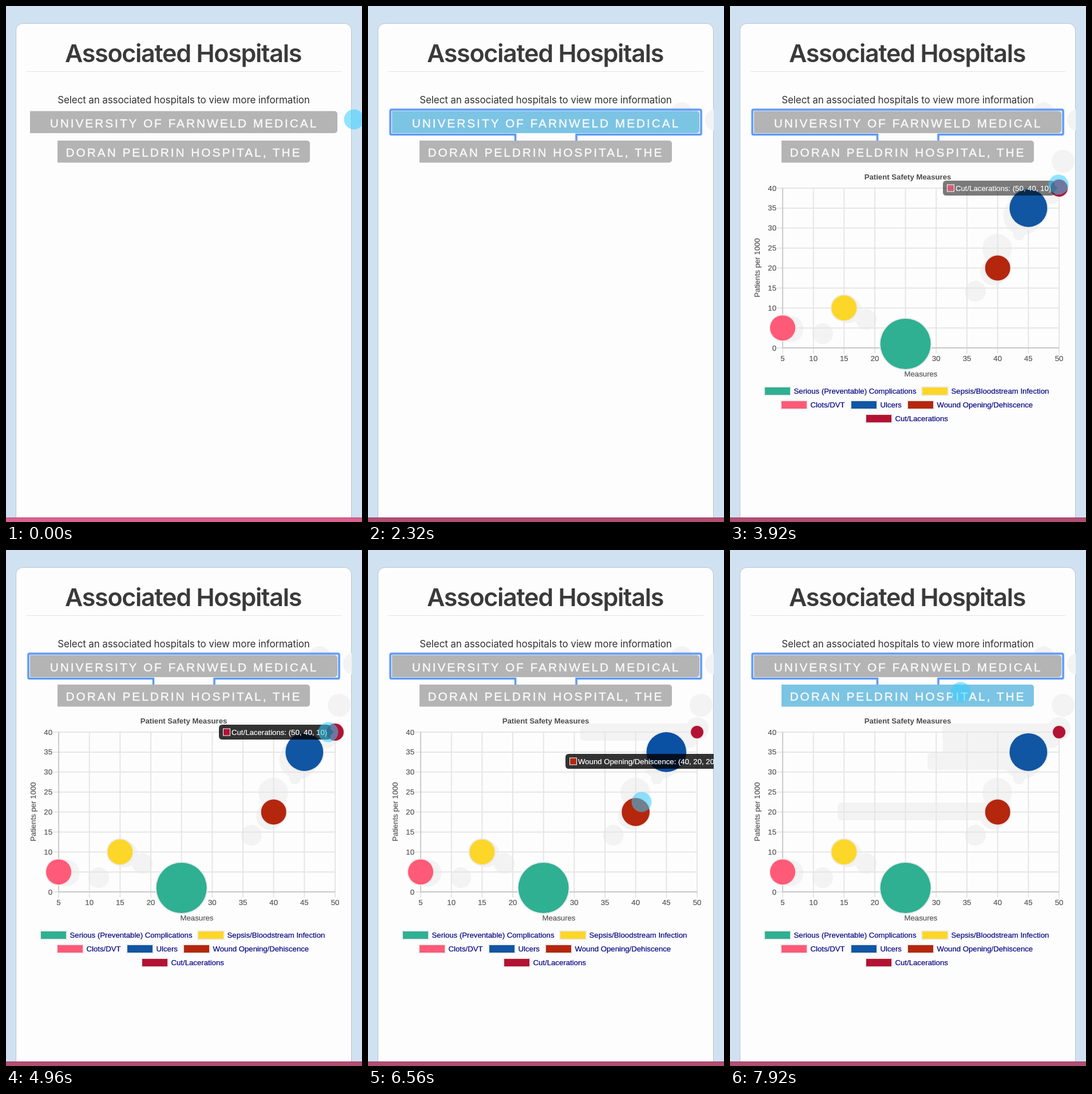
These frames come from a looping animation (622x901 px, 8000 ms). An HTML page:

```html
<!DOCTYPE html>
<html lang="en">
<head>
<meta charset="utf-8">
<title>Associated Hospitals</title>
<style>
html, body { margin: 0; width: 100%; height: 100%; overflow: hidden; background: #d0e2f2; }
svg { display: block; }
svg * { animation: 8s linear infinite; }

.head { font: 600 43px Inter, sans-serif; letter-spacing: -1.25px; fill: #3a3a3a; }
.sub { font: 400 17px Inter, sans-serif; letter-spacing: -.12px; fill: #333; }
.name {
  font: 20.8px "Liberation Sans", Arial, sans-serif; letter-spacing: 3px;
  fill: #fafafa; stroke: #fafafa; stroke-width: .4;
}
.chart, .tip { font: 13.2px "Liberation Sans", Arial, sans-serif; }
.chart text { fill: #555; stroke: #555; stroke-width: .2; }
.chart .title { font-weight: bold; fill: #4c4c4c; stroke: none; }
.chart .legend text { fill: #000080; stroke: #000080; }
.mid { text-anchor: middle; }
.end { text-anchor: end; }
.ghost { fill: #f3f3f3; }
.grid { stroke: #e6e6e6; stroke-width: 2; }
.axis { stroke: #bdbdbd; stroke-width: 1.3; fill: none; }
.halo { stroke: #ececec; stroke-width: 4; paint-order: stroke; }

/* 1% is 80 ms */
.strip { animation-name: strip; }
@keyframes strip { 0%, 7% { fill: #d9628e; } 9%, 100% { fill: #b04f72; } }
.first { animation-name: first; }
@keyframes first {
  0%, 12% { fill: #b4b4b4; } 17%, 39% { fill: #7cc4e4; } 47%, 100% { fill: #b4b4b4; }
}
.second { animation-name: second; }
@keyframes second { 0%, 94% { fill: #b4b4b4; } 99%, 100% { fill: #7cc4e4; } }
.ring {
  fill: none; stroke: #5b98f5; stroke-width: 3;
  filter: drop-shadow(0 0 1px #8fb8f8); animation-name: ring;
}
@keyframes ring { 0%, 24% { opacity: 0; } 27%, 100% { opacity: 1; } }
.chart { animation-name: chart; }
@keyframes chart { 0%, 29% { opacity: 0; } 32%, 100% { opacity: 1; } }
.grow { transform-origin: 333.5px 597px; animation-name: grow; }
@keyframes grow {
  0%, 30.6% { transform: scale(0); animation-timing-function: cubic-bezier(.25, 1, .5, 1); }
  43.1%, 100% { transform: scale(1); }
}
.cut { animation-name: cut; }
@keyframes cut { 0%, 47% { r: 11px; } 49%, 62% { r: 15px; } 67%, 100% { r: 11px; } }
.ulcer { animation-name: ulcer; }
@keyframes ulcer {
  0%, 64% { r: 33px; fill: #1156a3; } 69%, 79% { r: 37.5px; fill: #0048a3; }
  84%, 100% { r: 33px; fill: #1156a3; }
}
.wound { animation-name: wound; }
@keyframes wound { 0%, 79% { r: 22px; } 84%, 89% { r: 26px; } 92%, 100% { r: 22px; } }

.tip text { fill: #fff; stroke: #fff; stroke-width: .2; }
.tip1 { animation-name: tip1; }
@keyframes tip1 {
  0%, 47% { opacity: 0; } 49% { opacity: .65; } 52%, 62% { opacity: 1; } 67%, 100% { opacity: 0; }
}
.tip2 { animation-name: tip2; }
@keyframes tip2 {
  0%, 62% { opacity: 0; transform: translateY(-26px); }
  64% { opacity: .3; transform: translateY(-26px); }
  67% { opacity: 1; transform: translateY(-6px); }
  69%, 79% { opacity: 1; transform: none; }
  82%, 100% { opacity: 0; transform: none; }
}
.tip3 { animation-name: tip3; }
@keyframes tip3 {
  0%, 79% { opacity: 0; transform: translate(155px, -88px); }
  82% { opacity: 1; transform: translate(155px, -88px); }
  84% { opacity: 1; transform: translate(20px, -11px); }
  87% { opacity: 1; transform: none; }
  89% { opacity: .9; }
  92% { opacity: .7; }
  94% { opacity: .25; }
  97%, 100% { opacity: 0; transform: none; }
}

.cursor { fill: rgb(52, 207, 255); animation-name: move, fade; }
@keyframes move {
  0%, 7% { transform: translate(608px, 198px); }
  9% { transform: translate(588px, 192px); }
  12% { transform: translate(548px, 187px); }
  14% { transform: translate(485px, 217px); }
  17%, 39% { transform: translate(470px, 211px); }
  42% { transform: translate(490px, 215px); }
  44% { transform: translate(548px, 200px); }
  47% { transform: translate(583px, 271px); }
  49%, 59% { transform: translate(574px, 312px); }
  62% { transform: translate(563px, 318px); }
  64% { transform: translate(540px, 330px); }
  67%, 77% { transform: translate(521px, 340px); }
  79% { transform: translate(508px, 380px); }
  82% { transform: translate(478px, 440px); }
  84%, 87% { transform: translate(466px, 455px); }
  89% { transform: translate(462px, 432px); }
  92% { transform: translate(451px, 369px); }
  94% { transform: translate(436px, 325px); }
  97% { transform: translate(411px, 264px); }
  99%, 100% { transform: translate(403px, 248px); }
}
@keyframes fade {
  0%, 22% { opacity: .54; } 27%, 39% { opacity: 0; } 42%, 52% { opacity: .54; }
  57%, 59% { opacity: 0; } 62%, 100% { opacity: .54; }
}

.g14 { animation-name: g14; } @keyframes g14 { 0%, 14% { opacity: 0; } 17%, 100% { opacity: 1; } }
.g37 { animation-name: g37; } @keyframes g37 { 0%, 34% { opacity: 0; } 37%, 100% { opacity: 1; } }
.g39 { animation-name: g39; } @keyframes g39 { 0%, 37% { opacity: 0; } 39%, 100% { opacity: 1; } }
.g49 { animation-name: g49; } @keyframes g49 { 0%, 47% { opacity: 0; } 49%, 100% { opacity: 1; } }
.g67 { animation-name: g67; } @keyframes g67 { 0%, 64% { opacity: 0; } 67%, 100% { opacity: 1; } }
.g84 { animation-name: g84; } @keyframes g84 { 0%, 82% { opacity: 0; } 84%, 100% { opacity: 1; } }
.g97 { animation-name: g97; } @keyframes g97 { 0%, 94% { opacity: 0; } 97%, 100% { opacity: 1; } }
</style>
</head>
<body>
<svg width="622" height="901" viewBox="0 0 622 901">
  <clipPath id="card"><rect x="18" y="31" width="586" height="862"/></clipPath>
  <rect width="622" height="901" fill="#d0e2f2"/>
  <rect x="17.5" y="30.5" width="586" height="900" rx="12" fill="#fdfdfd" stroke="#b9c3cc"/>
  <path d="M36 114.5H586" stroke="#e3e3e3"/>

  <g class="ghost" clip-path="url(#card)">
    <g class="g14"><circle cx="608" cy="199" r="19"/><circle cx="548" cy="187" r="19"/></g>
    <g class="g37" id="trail1"></g>
    <g class="g39" id="trail2"></g>
    <circle class="g49" cx="582" cy="271" r="20"/>
    <g class="g67">
      <circle cx="575" cy="312" r="20"/><rect x="371" y="303" width="196" height="30" rx="6"/>
    </g>
    <g class="g84">
      <rect x="372" y="303" width="130" height="54" rx="6"/><rect x="345" y="354" width="146" height="30" rx="6"/>
    </g>
    <rect class="g97" x="188" y="441" width="270" height="31" rx="6"/>
  </g>

  <text class="head mid" x="309.500" y="98">Associated Hospitals</text>
  <text class="sub mid" x="310.5" y="170">Select an associated hospitals to view more information</text>

  <path class="first" d="M42 183.500H574a5 5 0 0 1 5 5V217a5 5 0 0 1 -5 5H42z"/>
  <text class="name mid" x="311" y="211.500">UNIVERSITY OF FARNWELD MEDICAL</text>
  <path class="ring" d="M257.500 236V224.500H41a2 2 0 0 1 -2 -2V183a2 2 0 0 1 2 -2H580a2 2 0 0 1 2 2V222.500a2 2 0 0 1 -2 2H364V236"/>
  <path class="second" d="M90 235H526a5 5 0 0 1 5 5V268.500a5 5 0 0 1 -5 5H90z"/>
  <text class="name mid" x="310.500" y="263">DORAN PELDRIN HOSPITAL, THE</text>

  <g class="chart">
    <g id="scales"></g>
    <text class="title mid" x="310.500" y="303">Patient Safety Measures</text>
    <text class="mid" x="333.500" y="647">Measures</text>
    <text class="mid" transform="translate(52 457) rotate(-90)">Patients per 1000</text>
    <g class="legend" id="legend"></g>
    <g class="grow" id="bubbles"></g>
  </g>
  <g id="tips" clip-path="url(#card)"></g>

  <rect class="strip" y="893" width="622" height="8"/>
  <path d="M0 893.500H622" stroke="#8c2850" stroke-opacity=".35"/>
  <circle class="cursor" r="17.500"/>
</svg>
<script>
const $ = id => document.getElementById(id);
const px = v => 92 + (v - 5) * 483 / 45;
const py = v => 597 - v * 279 / 40;

// label, x, y, radius, colour, class, legend position
const series = [
  ["Serious (Preventable) Complications", 25, 1, 44, "#2fb092", "", 61, 672],
  ["Sepsis/Bloodstream Infection", 15, 10, 22, "#fdd62a", "", 336, 672],
  ["Clots/DVT", 5, 5, 22, "#ff5a78", "", 90, 696],
  ["Ulcers", 45, 35, 33, "#1156a3", "ulcer", 212, 696],
  ["Wound Opening/Dehiscence", 40, 20, 22, "#b5270d", "wound", 311, 696],
  ["Cut/Lacerations", 50, 40, 11, "#b31232", "cut", 238, 720],
];

const line = (d, c) => `<path class="${c}" d="${d}"/>`;
let scales = "";
for (let v = 5; v <= 50; v += 5) {
  scales += line(`M${px(v)} 318V607`, "grid") +
    `<text class="mid" x="${px(v)}" y="620">${v}</text>`;
}
for (let v = 0; v <= 40; v += 5) {
  scales += line(`M82 ${py(v)}H575`, "grid") +
    `<text class="end" x="81" y="${py(v) + 4.5}">${v}</text>`;
}
$("scales").innerHTML = scales + line("M92 318V597H575", "axis");

$("bubbles").innerHTML = series.map(([, x, y, r, fill, cls]) =>
  `<circle class="halo ${cls}" cx="${px(x)}" cy="${py(y)}" r="${r}" fill="${fill}"/>`).join("");

$("legend").innerHTML = series.map(([label, , , , fill, , x, y]) =>
  `<rect class="halo" x="${x}" y="${y - 6}" width="44" height="13" fill="${fill}"/>` +
  `<text x="${x + 50.5}" y="${y + 4.5}">${label}</text>`).join("");

// faint marks left behind by the growing bubbles
const trail = p => series.map(([, x, y, r]) =>
  `<circle cx="${333.5 + (px(x) - 333.5) * p}" cy="${597 + (py(y) - 597) * p}" r="${r * p + 2.5}"/>`).join("");
$("trail1").innerHTML = trail(.71);
$("trail2").innerHTML = trail(.946);

const tip = (cls, x, right, y, fill, text) =>
  `<g class="tip ${cls}"><path fill="#000" fill-opacity=".8" d="M${x + 6} ${y - 13}H${right - 6}q6 0 6 6V${y - 5.5}l5.500 5.500l-5.500 5.500V${y + 7}q0 6 -6 6H${x + 6}q-6 0 -6 -6V${y - 7}q0 -6 6 -6z"/>` +
  `<rect x="${x + 7.5}" y="${y - 6}" width="12" height="12" fill="${fill}" stroke="#fff"/>` +
  `<text x="${x + 22}" y="${y + 4.5}">${text}</text></g>`;
$("tips").innerHTML =
  tip("tip1", 372, 567, 318, "#b31232", "Cut/Lacerations: (50, 40, 10)") +
  tip("tip2", 375, 514, 352.5, "#0048a3", "Ulcers: (45, 35, 30)") +
  tip("tip3", 190, 461, 457, "#b5270d", "Wound Opening/Dehiscence: (40, 20, 20)");

// the screen refreshes in alternating holds of 160 and 240 ms
const snap = t => {
  if (t < 160) return 0;
  const m = (t - 160) % 400;
  return t - m + (m < 160 ? 0 : 160);
};
const anims = document.getAnimations();
anims.forEach(a => a.pause());
const start = performance.now();
function draw() {
  const t = snap((performance.now() - start) % 8000);
  anims.forEach(a => { a.currentTime = t; });
  requestAnimationFrame(draw);
}
draw();
</script>
</body>
</html>
```
